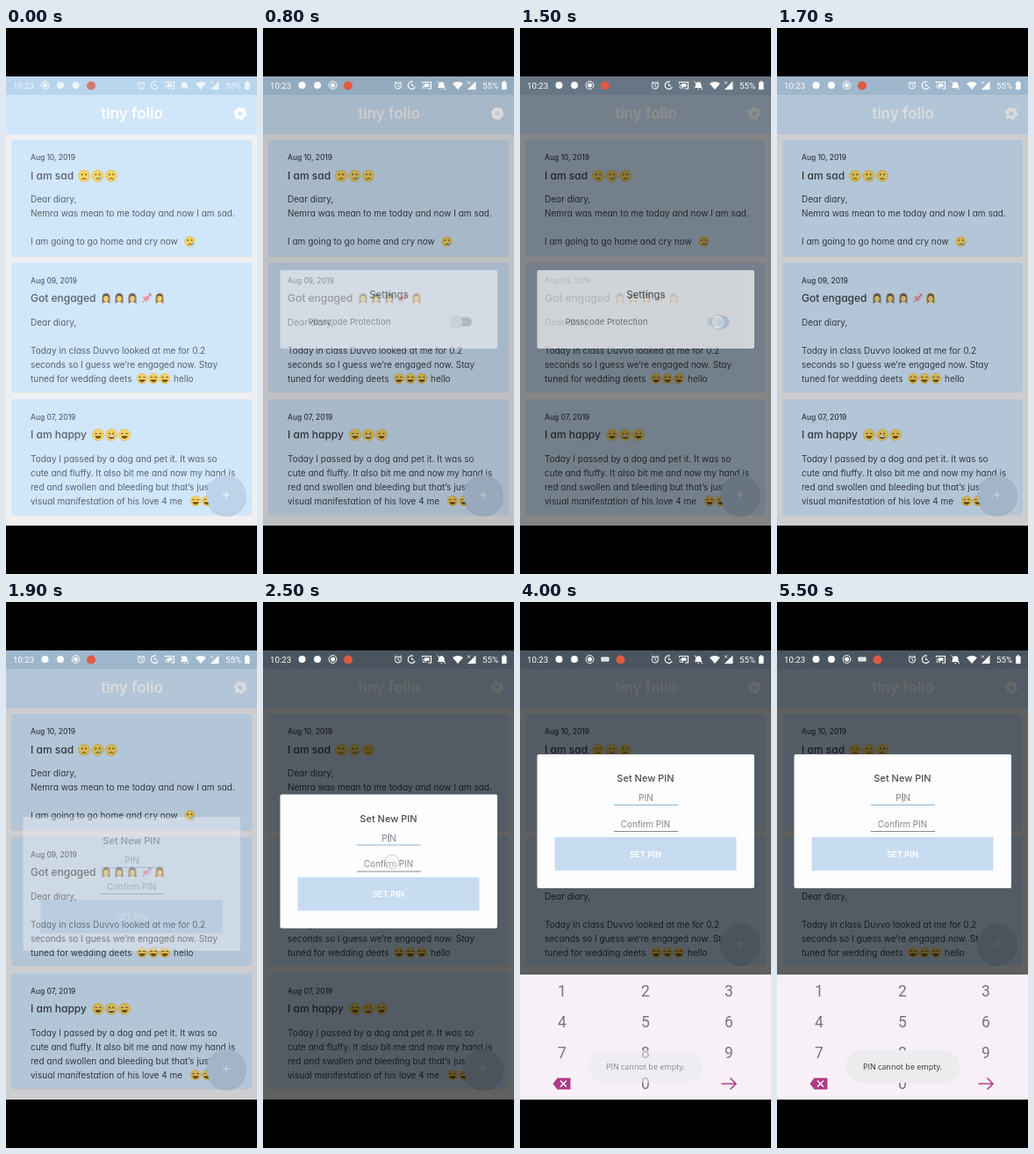
These frames come from a looping animation (286x620 px, 5600 ms). An HTML page:

```html
<!DOCTYPE html>
<html lang="en">
<head>
<meta charset="utf-8">
<title>Diary app</title>
<style>
  html, body { margin: 0; width: 100%; height: 100%; overflow: hidden; background: #000; }
  svg { display: block; width: 286px; height: 620px; }
  text { font: 10px Inter, sans-serif; font-feature-settings: "cv11"; white-space: pre; }
  .mid { text-anchor: middle; }
  .sys { font-family: Roboto, sans-serif; }
</style>
</head>
<body>
<svg id="stage" viewBox="0 0 286 620"></svg>
<script>
const LOOP = 5600, STEP = 100;
const INK = '#3c4248', BLUE = '#d0e6fb';

const text = (x, y, s, size = 10, fill = INK, weight = 400, cls = '') =>
  `<text x="${x}" y="${y}" class="${cls}" fill="${fill}" style="font-size:${size}px;font-weight:${weight}">${s}</text>`;
const rect = (x, y, w, h, fill, r = 0, extra = '') =>
  `<rect x="${x}" y="${y}" width="${w}" height="${h}" rx="${r}" fill="${fill}" ${extra}/>`;
const dot = (x, y, r, fill, extra = '') => `<circle cx="${x}" cy="${y}" r="${r}" fill="${fill}" ${extra}/>`;
const line = (d, color, width = 1, extra = '') =>
  `<path d="${d}" fill="none" stroke="${color}" stroke-width="${width}" ${extra}/>`;
const group = (id, body, extra = '') => `<g id="${id}" ${extra}>${body}</g>`;

// Emoji: a yellow face with a mood-dependent mouth
const mouths = {
  sad: line('M-2.5 3.8Q0 1.2 2.5 3.8', '#6b4a18'),
  cry: line('M-2 3.6Q0 1.6 2 3.6', '#6b4a18') + dot(3, 2.6, 1.5, '#7db9e8'),
  grin: '<path d="M-4 .8H4Q3.4 4.6 0 4.6T-4 .8Z" fill="#6b4a18"/><path d="M-3.4 1H3.4V2.3H-3.4Z" fill="#fff"/>',
  laugh: '<path d="M-3.6 1.2H3.6Q3 4.2 0 4.2T-3.6 1.2Z" fill="#7a4e14"/>'
};
const face = (x, y, mood, r = 6.5) => `<g transform="translate(${x} ${y})">` +
  dot(0, 0, r, '#f5d565', 'stroke="#dcb545" stroke-width=".6"') +
  (mood === 'laugh'
    ? line('M-4-1L-2-2L-1-1M1-1L2-2L4-1', '#6b4a18', .9)
    : dot(-2.2, -1.6, .9, '#6b4a18') + dot(2.2, -1.6, .9, '#6b4a18')) +
  mouths[mood] + '</g>';
const bride = (x, y, veil) => `<g transform="translate(${x} ${y})">` +
  `<path d="M-5 6V-1A5 5.5 0 0 1 5-1V6Z" fill="${veil}"/>` +
  '<path d="M-3.6 4V-1A3.6 4.2 0 0 1 3.6-1V4Z" fill="#6e5540"/>' +
  '<ellipse cy=".6" rx="2.8" ry="3.7" fill="#f0cf70"/><path d="M-4 6.5Q0 3 4 6.5Z" fill="#f5f3f2"/></g>';
const heart = (x, y) => `<g transform="translate(${x} ${y})">` +
  '<path d="M0 4L-4 0Q-4-4 0-2Q4-4 4 0Z" fill="#eda0b8"/>' + line('M-5 5L5-5M2-5H5V-2', '#d46a78') + '</g>';

const card = (y, h, date, title, lines) =>
  rect(6, y + 1, 274, h, '#dde3e9', 3) + rect(6, y, 274, h, BLUE, 3) +
  '<g class="ink">' + text(28, y + 23, date, 8.4, INK, 500) + text(28, y + 44.5, title, 12, INK, 500) +
  lines.map((s, i) => s && text(28, y + 71 + i * 16, s)).join('') + '</g>';

const cards =
  card(127, 132, 'Aug 10, 2019', 'I am sad',
    ['Dear diary,', 'Nemra was mean to me today and now I am sad.', '', 'I am going to go home and cry now']) +
  card(266.5, 146.5, 'Aug 09, 2019', 'Got engaged',
    ['Dear diary,', '', 'Today in class Duvvo looked at me for 0.2',
     'seconds so I guess we’re engaged now. Stay', 'tuned for wedding deets']) +
  card(421.5, 131, 'Aug 07, 2019', 'I am happy',
    ['Today I passed by a dog and pet it. It was so', 'cute and fluffy. It also bit me and now my hand is',
     'red and swollen and bleeding but that’s just a', 'visual manifestation of his love 4 me']) +
  `<g class="ink">${text(191, 401.5, 'hello')}</g>` +
  face(89, 168, 'sad') + face(104.5, 168, 'cry') + face(120, 168, 'sad') + face(209.5, 242.5, 'cry', 5.7) +
  bride(114, 307, '#a5adb8') + bride(129, 307, '#a5adb8') + bride(144, 307, '#a5adb8') +
  heart(160, 307) + bride(175, 307, '#c9b87e') +
  [155, 168, 181].map(x => face(x, 398, 'laugh', 5.7)).join('') +
  face(105, 462, 'laugh') + face(120, 462, 'grin') + face(135, 462, 'laugh') +
  face(216, 537, 'laugh', 5.7) + face(229, 537, 'laugh', 5.7);

const gear = dot(267, 97, 4.4, 'none', 'stroke="#fff" stroke-width="3.6"') +
  dot(267, 97, 6.6, 'none', 'stroke="#fff" stroke-width="2" stroke-dasharray="3.2 3.71"');

const home = rect(0, 55, 286, 510, '#f0f0f2') + cards +
  rect(0, 76, 286, 45, BLUE) + rect(0, 55, 286, 21, '#b9d5ee') +
  text(143.5, 103, 'tiny folio', 17, '#fff', 600, 'mid') + gear +
  group('fab', dot(251, 532, 23, '#8fa3b5', 'opacity=".35"') + dot(251, 530, 22.5, '#bcd3e9') +
    line('M247 530H255M251 526V534', '#f4f9ff', 1.1));

const recording = dot(0, 65, 4.4, 'none', 'stroke="#fff"') + dot(0, 65, 2.5, '#fff');
const status =
  text(8, 69, '10:23', 9.7, '#fff', 400, 'sys') +
  group('noticeA', dot(0, 65, 4, '#fff') + dot(17.5, 65, 4, '#fff')) + group('rec', recording) +
  group('keysIcon', rect(92.5, 62.5, 9, 5, '#fff', .8) + line('M94 64.2H100.5M94 66H100.5', '#66737e', .7, 'stroke-dasharray="1 .8"')) +
  group('badge', dot(0, 65.5, 5, '#df5a43')) +
  dot(154, 65.5, 3.6, 'none', 'stroke="#fff"') +
  line('M154 63.3V65.8L155.8 66.8M149.8 62.6L152 60.8M158.2 62.6L156 60.8', '#fff') +
  line('M171 61.2A4.2 4.2 0 1 0 173.3 67', '#fff', 1.2) + line('M169.5 63V65.5H172', '#fff') +
  line('M181.5 63V61.5H191.5V69H188M181.5 65A4 4 0 0 1 185.5 69M181.5 67.3A1.8 1.8 0 0 1 183.3 69', '#fff', 1.1) +
  rect(184, 63.2, 5.5, 3.6, '#fff') +
  '<path d="M199 68H207.5L206.5 66V64A3.3 3.3 0 0 0 200 64V66ZM202 69H204.6L203.3 70Z" fill="#fff"/>' +
  line('M198.5 60.5L208 70', '#fff') +
  '<path d="M216 63Q222 58.8 228 63L222 70Z" fill="#fff"/><path d="M233 70H242.5V60.5Z" fill="#fff"/>' +
  line('M233 60.5L236 63.5M236 60.5L233 63.5', '#fff', .8) +
  text(250, 69, '55%', 9.8, '#fff', 400, 'sys') + rect(272, 61.5, 5.6, 8.5, '#fff', .7) + rect(273.6, 60.3, 2.4, 1.5, '#fff');

const settings =
  rect(19.5, 275, 247.5, 89, '#fff', 2) + text(143.5, 307, 'Settings', 11.3, '#4b4b4d', 500, 'mid') +
  text(51.5, 336.5, 'Passcode Protection', 9.6, '#666') +
  rect(213, 328.5, 25, 10.5, '#b8b8b8', 5, 'id="track"') + dot(220, 334, 7.3, '#ececec', 'id="thumb" stroke="#dadada" stroke-width=".6"');

// Laid out from its own top edge so it can slide
const pinDialog =
  rect(19.5, 0, 247.5, 152, '#fefdff', 2) + text(143, 31, 'Set New PIN', 11, '#4b4b4d', 500, 'mid') +
  text(143.5, 53, 'PIN', 10, '#858585', 400, 'mid') + line('M107 57.5H180', '#86b5da', 1, 'id="focusLine"') +
  line('M143.5 44V54.5', '#86a9c8', 1, 'id="caret"') +
  text(143, 82.5, 'Confirm PIN', 9.8, '#858585', 400, 'mid') + line('M107 87.5H180', '#8a8a8a') +
  rect(39.5, 94, 207, 38, '#c8dcf1') + group('ripple', rect(39.5, 94, 207, 38, '#aecbe8')) +
  text(143, 116.5, 'SET PIN', 9.4, '#fff', 600, 'mid');

const digits = [...'1234567890'].map((d, i) => {
  const col = d === '0' ? 1 : i % 3, row = Math.floor(i / 3);
  return text(48 + col * 95, 447.5 + row * 35.3, d, 17.5, '#77757b', 400, 'sys mid');
}).join('');
const keyboard = rect(0, 423, 286, 142, '#f7f0f8') + digits +
  '<path d="M37.5 547L42.5 540.5H57.5V553.5H42.5Z" fill="#ae3b84"/>' + line('M46 543.5L53 550.5M53 543.5L46 550.5', '#fff', 1.5) +
  line('M229.5 547H246M239.5 540.5L246 547L239.5 553.5', '#b53f89', 1.6);
const toast = rect(78, 509, 130, 37, '#ececee', 18.5) +
  `<g style="font-family:'Open Sans'"><text x="143" y="531" class="mid" fill="#333" style="font-family:'Open Sans',sans-serif;font-size:9px">PIN cannot be empty.</text></g>`;

document.getElementById('stage').innerHTML =
  '<clipPath id="screen"><rect y="55" width="286" height="510"/></clipPath>' + rect(0, 0, 286, 620, '#000') +
  '<g clip-path="url(#screen)">' + home + group('dim', rect(0, 55, 286, 510, '#000')) + group('status', status) +
  group('settings', settings) + group('pin', pinDialog) + group('keyboard', keyboard) + group('toast', toast) +
  group('touch', dot(0, 0, 8, '#fff', 'fill-opacity=".55" stroke="#999" stroke-width="1"')) + '</g>';

const el = id => document.getElementById(id);
const inks = document.querySelectorAll('.ink');
const fade = (id, value) => el(id).setAttribute('opacity', value);
const move = (id, x, y) => el(id).setAttribute('transform', `translate(${x} ${y})`);

// Linear interpolation through [time, value] pairs
function at(t, ...keys) {
  if (t <= keys[0][0]) return keys[0][1];
  for (let i = 1; i < keys.length; i++) {
    const [a, from] = keys[i - 1], [b, to] = keys[i];
    if (t <= b) return from + (to - from) * (t - a) / (b - a);
  }
  return keys[keys.length - 1][1];
}

const taps = [[600, 267, 97], [1300, 226, 334], [2300, 147, 295], [3600, 147, 287]];

function draw(t) {
  const inkLevel = at(t, [0, .8], [500, 1]);
  inks.forEach(g => g.setAttribute('opacity', inkLevel));
  fade('dim', at(t, [700, 0], [1000, .6], [1400, .6], [1700, .14], [1800, .09], [1900, .14], [2200, .6]));
  fade('status', at(t, [0, .75], [500, 1]));

  const reordered = t >= 300, typing = t >= 2700;
  move('noticeA', reordered ? 44.5 : 62, 0);
  move('rec', reordered ? 79.5 : 44.5, 0);
  fade('keysIcon', +typing);
  move('badge', typing ? 114.5 : 97, 0);
  move('fab', 0, typing ? -142 : 0);

  fade('settings', at(t, [700, 0], [900, 1], [1400, 1], [1700, 0]));
  const on = at(t, [1300, 0], [1500, 1]);
  el('thumb').setAttribute('cx', 220 + 11 * on);
  el('thumb').setAttribute('fill', on > .4 ? '#c3dbf3' : '#ececec');
  el('track').setAttribute('fill', on > .4 ? '#dbe9f6' : '#b8b8b8');

  fade('pin', at(t, [1800, 0], [1900, .35], [2100, 1]));
  move('pin', 0, at(t, [2400, 244], [2500, 218.5], [2600, 190], [2700, 173]));
  fade('caret', +(t >= 2400 && t % 1000 >= 500));
  fade('ripple', at(t, [3600, 0], [3700, .6], [4000, 0]));
  move('keyboard', 0, at(t, [2500, 142], [2800, 0]));
  fade('toast', at(t, [3800, 0], [4000, .55], [4200, 1]));

  const tap = taps.find(([start]) => t >= start && t < start + 300);
  fade('touch', tap ? at(t - tap[0], [0, .9], [100, .9], [200, .5], [300, 0]) : 0);
  if (tap) move('touch', tap[1], tap[2]);
}

function frame() {
  const t = performance.now() % LOOP;
  draw(Math.floor(t / STEP) * STEP);
  requestAnimationFrame(frame);
}
frame();
</script>
</body>
</html>
```
